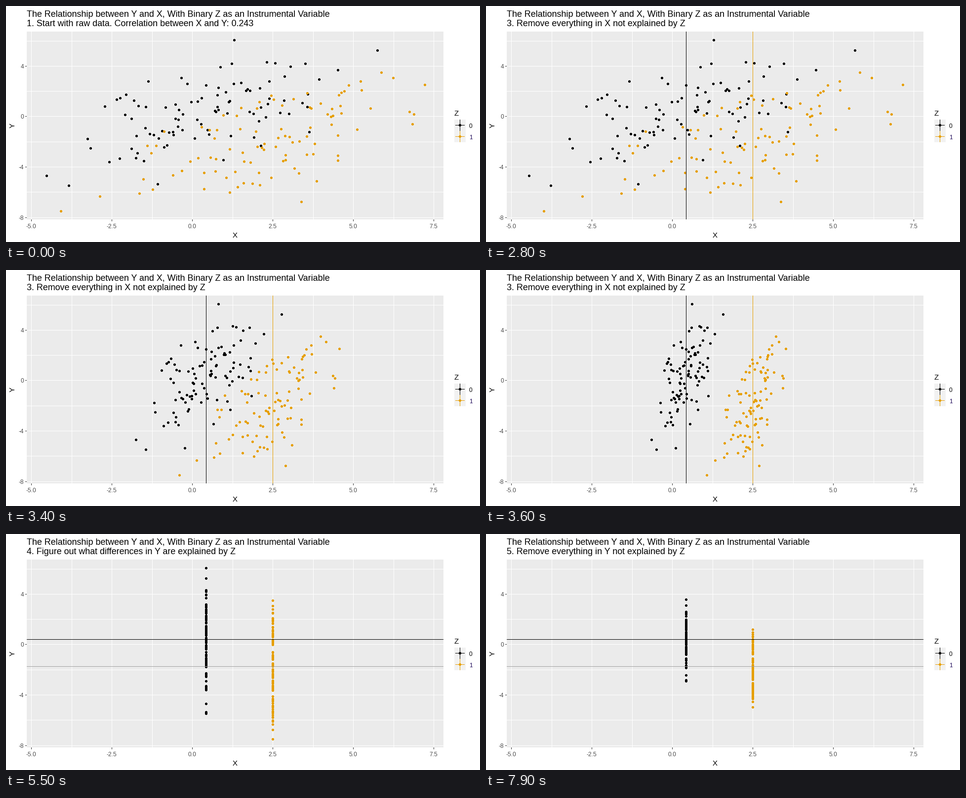
Write a matplotlib script that moves like this. It is 960 px wide and 480 px high and loops after 8 s.

```python
import numpy as np
import matplotlib.pyplot as plt
from matplotlib.animation import FuncAnimation
from matplotlib.collections import PolyCollection
from matplotlib.patches import Rectangle

plt.rcParams["font.family"] = "Liberation Sans"

W, H, DPI = 960, 480, 96
LEFT, TOP, RIGHT, BOTTOM = 42, 52, 886, 434
BLACK, ORANGE, GREY = "#000000", "#E69F00", "#A0A0A0"
TITLE_PX = 17.9
STEPS = 13

fig = plt.figure(figsize=(W / DPI, H / DPI), dpi=DPI, facecolor="white")
ax = fig.add_axes([0, 0, 1, 1])
ax.set_xlim(0, W)
ax.set_ylim(H, 0)
ax.axis("off")


def box(x, y, w, h, color, z=1):
    return ax.add_patch(Rectangle((x, y), w, h, fc=color, lw=0,
                                  snap=True, zorder=z))


def label(x, y, text, px, color="black", **kw):
    return ax.text(x, y, text, fontsize=px * 72 / DPI, color=color, **kw)


def col(x):
    return int(377.5 + 65.2 * x)


def row(y):
    return int(224.95 - 25.65 * y)


# Panel, grid and axes
box(LEFT, TOP, RIGHT - LEFT, BOTTOM - TOP, "#EBEBEB")
for x in np.arange(-5, 7.6, 1.25):
    box(col(x), TOP, 1, BOTTOM - TOP, "white")
for y in range(-8, 7, 2):
    box(LEFT, row(y), RIGHT - LEFT, 1, "white")
for x in np.arange(-5, 7.6, 2.5):
    box(col(x), BOTTOM, 1, 4, "#333333")
    label(col(x), 452, f"{x:.1f}", 12, "#4D4D4D", ha="center")
for y in range(-8, 5, 4):
    box(LEFT - 3, row(y), 3, 1, "#333333")
    label(36, row(y) + 5, str(y), 12, "#4D4D4D", ha="right")
label(464, 471, "X", 15, ha="center")
label(14, 243, "Y", 15, ha="center", va="center", rotation=90)

# Without antialiasing every touched pixel is filled: this gives 5 px dots
turn = np.arange(16) * np.pi / 8
disc = 2.05 * np.column_stack([np.cos(turn), np.sin(turn)])


def outlines(pos):
    return (np.floor(pos) + 0.5)[:, None] + disc


def dots(pos, color, z):
    return ax.add_collection(PolyCollection(
        outlines(pos), facecolors=color, edgecolors="none", linewidths=0,
        antialiaseds=False, zorder=z), autolim=False)


# Legend
label(908, 223, "Z", 15)
for n, (color, ink) in enumerate([(BLACK, "black"), (ORANGE, "#1F0A5A")]):
    y = 231 + 23 * n
    box(908, y, 23, 23, "#F2F2F2")
    box(919, y, 1, 23, color, 2)
    box(910, y + 11, 19, 1, color, 2)
    dots(np.array([[919, y + 11]]), color, 3)
    label(938, y + 17, str(n), 12, ink)

# Titles
label(42, 22, "The Relationship between Y and X, "
              "With Binary Z as an Instrumental Variable", TITLE_PX)
subtitle = label(42, 41, "", TITLE_PX)
SUBTITLES = [
    (0, "1. Start with raw data. Correlation between X and Y: 0.243"),
    (5, "2. Figure out what differences in X are explained by Z"),
    (28, "3. Remove everything in X not explained by Z"),
    (51, "4. Figure out what differences in Y are explained by Z"),
    (74, "5. Remove everything in Y not explained by Z"),
]

rng = np.random.RandomState(12)


def cloud(n, mean, sx, sy, slope):
    """Tilted normal cloud around a mean, cut off at two deviations."""
    u = rng.normal(size=(n * 3, 2))
    u = u[np.hypot(*u.T) < 2][:n]
    u -= u.mean(axis=0)
    dx = sx * u[:, 0]
    return mean + np.column_stack([dx, sy * u[:, 1] + slope * dx])


# Each group is a random cloud plus its outermost points
tips0 = [(462, 69), (752, 90), (82, 345), (127, 365), (307, 362)]
tips1 = [(111, 417), (190, 387), (848, 160), (823, 240), (598, 398)]
groups = []
for mean, sx, sy, slope, tips, color, level in [
    ((405, 214), 140, 57, -0.18, tips0, BLACK, BLACK),
    ((540, 269), 150, 60, -0.25, tips1, ORANGE, GREY),
]:
    mid = np.array(mean) + 0.5
    start = np.vstack([np.array(tips) + 0.5, cloud(92, mid, sx, sy, slope)])
    groups.append((start, mid, dots(start, color, 4),
                   box(mean[0], TOP, 1, BOTTOM - TOP, color, 5),
                   box(LEFT, mean[1], RIGHT - LEFT, 1, level, 5)))


def ease(t):
    return (1 - np.cos(np.pi * np.clip(t, 0, 1))) / 2


def update(i):
    subtitle.set_text([s for first, s in SUBTITLES if i >= first][-1])
    moved = np.array([ease((i - 27) / STEPS), ease((i - 73) / STEPS)])
    for start, mid, points, vline, hline in groups:
        points.set_verts(outlines(start + (mid - start) * moved))
        vline.set_visible(9 <= i < 51)
        hline.set_visible(i >= 55)
    return []


anim = FuncAnimation(fig, update, frames=80, interval=100, repeat=True,
                     repeat_delay=0, blit=False)
plt.show()
```
